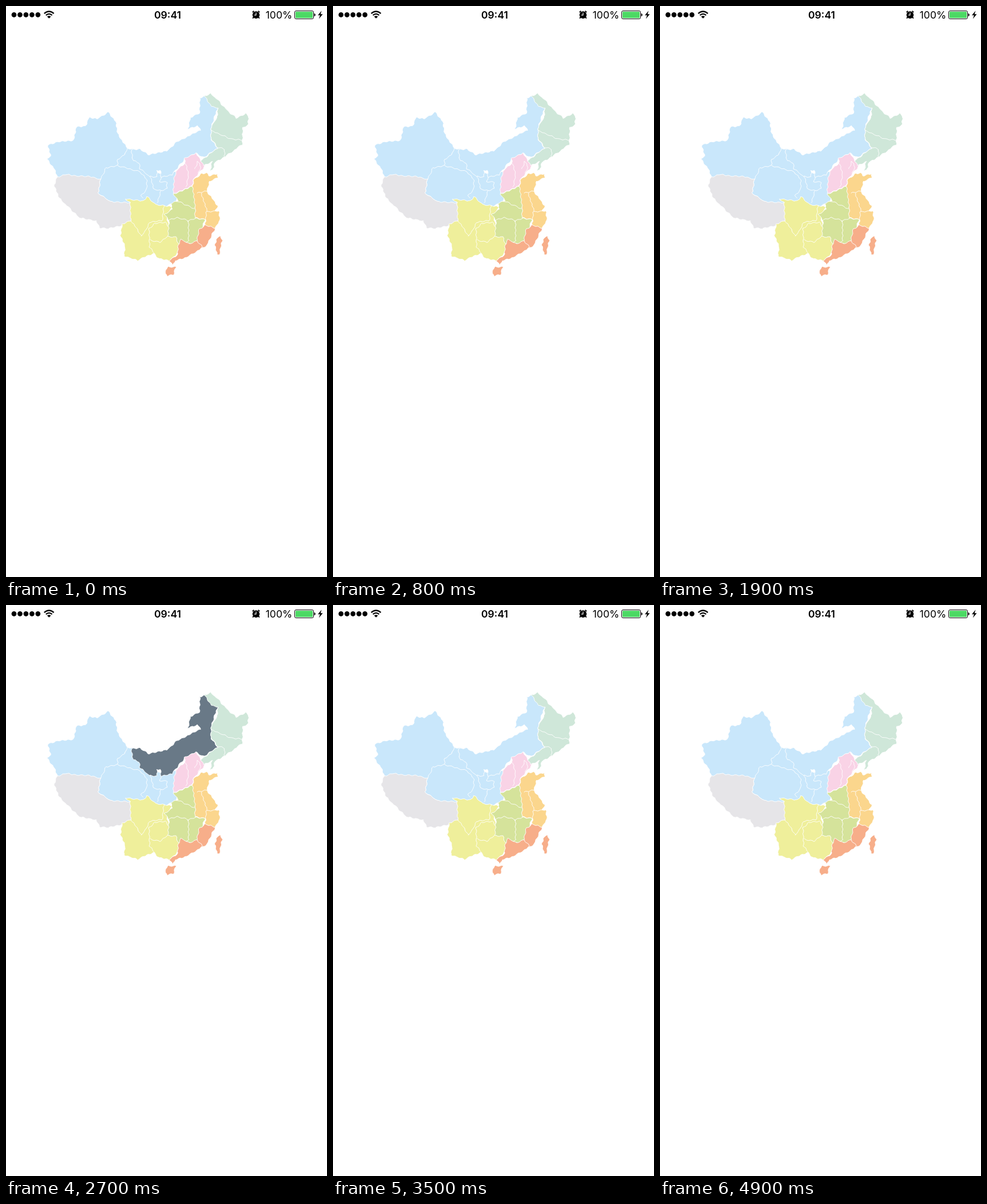
Animation, 561 px wide and 998 px high, one loop 5000 ms. Source, as an HTML page:

```html
<!DOCTYPE html>
<html lang="en">
<head>
<meta charset="utf-8">
<title>Tap map</title>
<style>
  html, body { margin: 0; width: 100%; height: 100%; overflow: hidden; background: #fff; }
  svg { display: block; width: 100vw; height: 100vh; }
  text { font-family: Inter, Roboto, sans-serif; font-size: 17.6px; text-anchor: middle; }
  .line { fill: none; stroke: #000; }
  #map path { fill: var(--c); stroke: #fff; stroke-width: .9; stroke-linejoin: round; }
  #map .border { fill: none; }
  #map .tap { animation: tap 5s step-end var(--at) infinite; }
  @keyframes tap {
    0% { fill: #697987; }
    4%, 100% { fill: var(--c); }
  }
</style>
</head>
<body>
<svg viewBox="0 0 561 998">
  <path class="line" d="M14 15.300h42" stroke-width="8.800" stroke-linecap="round" stroke-dasharray="0 10.450"/>
  <path class="line" d="M66.800 13.200q8.400-7.400 16.800 0M69.800 16.200q5.400-4.600 10.800 0" stroke-width="2.300"/>
  <path d="M71.900 18.500q3.300-2.600 6.600 0l-3.300 3.300z"/>
  <text x="282.500" y="21.600" font-weight="600">09:41</text>
  <circle cx="437" cy="15.600" r="6.300"/>
  <path class="line" d="M430.800 11l2.500-2.200M443.200 11l-2.500-2.200M431 21.500l2-2M443 21.500l-2-2" stroke-width="1.800"/>
  <path d="M437 11.600v4.300h-3" fill="none" stroke="#fff" stroke-width="1.200"/>
  <text x="477" y="21.700">100%</text>
  <rect class="line" x="504.500" y="8.500" width="33" height="14" rx="2.400"/>
  <rect x="506" y="10" width="30" height="11" rx="1" fill="#4cd964"/>
  <path d="M538.600 12.800q2.200.6 2.200 2.700t-2.200 2.700z"/>
  <path d="M551.600 8.300l-6.600 7.900h3.900l-2.100 6.200 6.800-8.200h-3.900z"/>
  <g id="map"></g>
</svg>
<script>
  const map = document.getElementById('map');

  // Offset depends on position only, so neighbouring areas share their coast.
  const rough = (x, y) => [
    x + 0.9 * Math.sin(y * 0.62 + x * 0.13),
    y + 0.9 * Math.sin(x * 0.57 - y * 0.11)
  ];

  function trace(text, closed) {
    const pts = text.split(' ').map(p => p.split(',').map(Number));
    const out = [];
    pts.forEach(([x, y], i) => {
      const last = i === pts.length - 1;
      if (last && !closed) return out.push(rough(x, y));
      const [u, v] = pts[(i + 1) % pts.length];
      const n = Math.ceil(Math.hypot(u - x, v - y) / 3);
      for (let k = 0; k < n; k++) out.push(rough(x + (u - x) * k / n, y + (v - y) * k / n));
    });
    return 'M' + out.map(p => p.map(c => c.toFixed(1))).join('L') + (closed ? 'Z' : '');
  }

  function add(text, closed) {
    const path = document.createElementNS(map.namespaceURI, 'path');
    path.setAttribute('d', trace(text, closed));
    return map.appendChild(path);
  }

  function area(color, text, tapAt) {
    const path = add(text, true);
    path.style.setProperty('--c', color);
    if (tapAt === undefined) return;
    path.classList.add('tap');
    path.style.setProperty('--at', tapAt + 's');
  }

  const border = text => add(text, false).classList.add('border');

  const blue = '#c9e7fb', grey = '#e6e5e8', yellow = '#efef9b', pink = '#f9d3e6',
    mint = '#cfe7d9', green = '#d5e39b', orange = '#fbd68d', coral = '#f7ae8a';

  // Later areas cover the edges of earlier ones.
  area(blue, '90,301 84,284 72,268 78,262 73,243 91,237 118,235 123,211 139,210 145,195 160,197 179,185 192,203 195,223 213,250 196,282 165,306', 0.5);
  area(blue, '212,249 222,250 265,292 299,290 298,341 277,351 207,346 183,342 161,327 165,303 175,283 195,279 195,268 208,259');
  border('195,279 235,290 246,304 246,321 236,331 239,337');
  border('252,297 258,320 271,323 281,319 281,308 269,307 271,297');
  border('271,323 264,345');
  area(blue, '219,251 235,250 249,260 282,253 299,237 340,217 335,210 318,215 322,196 338,187 339,161 347,158 370,178 359,210 358,233 370,248 346,265 331,257 312,268 290,295 271,299 270,287 264,288 264,299 251,298 234,284 233,274 222,270', 2.7);

  area(grey, '90,299 104,294 122,297 147,298 165,303 161,327 183,342 217,344 221,375 202,384 178,389 164,388 157,376 128,370 93,336 84,312', 1.7);

  area(yellow, '276,349 291,351 280,365 285,385 284,403 299,403 304,417 300,432 286,445 268,442 258,433 240,439 231,445 206,437 208,420 200,400 203,382 218,375');
  area(yellow, '209,337 240,341 246,333 262,347 276,349 273,375 251,378 246,389 237,402 218,374 217,344', 1.1);
  border('250,389 260,380 278,378 284,386');
  border('250,389 251,421 260,434');
  border('252,409 268,413 283,403');

  area(pink, '300,284 313,276 312,267 331,257 341,270 350,277 328,303 325,315 292,328 294,300');
  border('314,276 319,295 315,316');
  border('330,285 335,272 341,282 336,291');

  area(mint, '347,158 358,153 372,166 388,184 403,196 418,188 424,192 423,207 414,213 413,242 382,264 365,273 362,287 357,288 360,272 346,279 341,270 370,248 358,233 359,210 369,195 370,178 360,176');
  border('359,218 395,233 413,234');
  border('358,232 370,247 382,250 382,264');

  area(green, '292,329 326,315 331,330 331,371 348,373 334,414 318,416 297,404 285,374 277,365 291,354 288,345 302,340');
  border('300,341 330,355');
  area(green, '285,374 300,370 319,375 319,411 301,416 297,404 283,403', 3.7);
  border('318,376 331,371');

  area(orange, '326,315 328,304 341,293 350,292 355,297 370,293 370,299 356,307 351,324 370,349 366,358 348,373 330,370 331,355');
  border('333,327 352,323');
  border('341,326 352,360');
  area(orange, '350,360 372,358 374,374 366,388 348,384', 3.1);

  area(coral, '338,390 348,383 366,388 350,420 342,424 333,411');
  area(coral, '301,417 306,408 321,416 334,410 344,422 315,440 296,445 292,453 286,445 300,434', 4.3);
  area(coral, '278,461 284,456 297,456 293,469 281,472');
  area(coral, '368,407 375,402 378,409 373,434 369,435 365,419');
</script>
</body>
</html>
```
